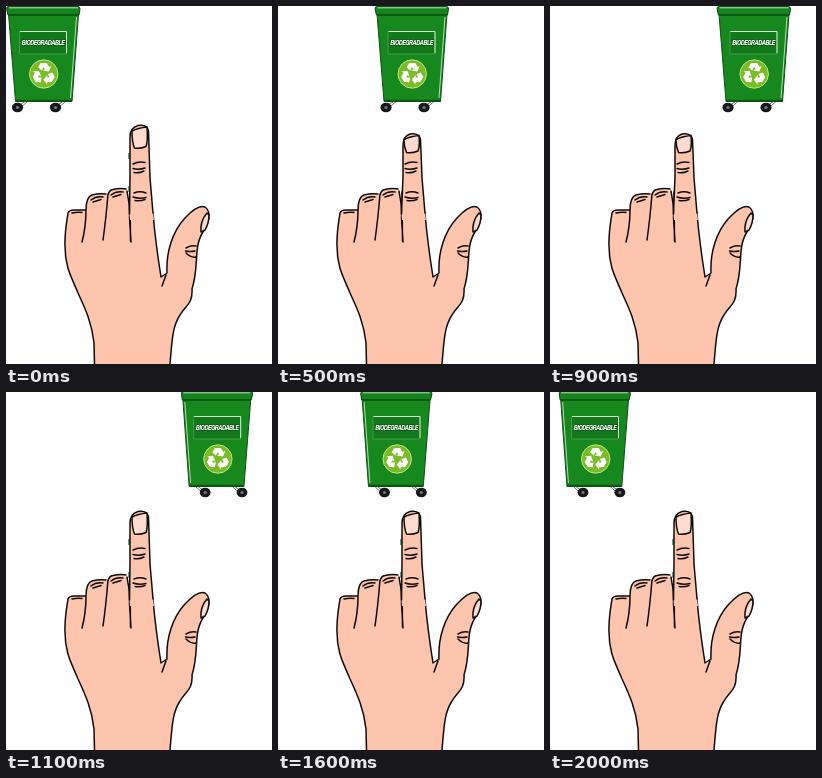
Animation of 266 by 358 pixels, one loop 2100 ms. Source, as an HTML page:

```html
<!DOCTYPE html>
<html lang="en">
<head>
<meta charset="utf-8">
<title>Finger and bin</title>
<style>
html, body { margin: 0; width: 100%; height: 100%; overflow: hidden; background: #fff; }
svg { display: block; width: 266px; height: 358px; }
.ink { fill: none; stroke: #100c0a; stroke-width: 1.5; stroke-linecap: round; stroke-linejoin: round; }
.skin { fill: #fdc4ae; }
.ink.nail { fill: #fddbcd; }
.label { font: italic 700 6.6px Roboto, "Liberation Sans", sans-serif; letter-spacing: -.6px; text-anchor: middle;
  fill: #fff; stroke: #0a4a10; stroke-width: 1px; paint-order: stroke; }
</style>
</head>
<body>
<svg viewBox="0 0 266 358">
  <defs>
    <g id="wheel">
      <path d="M0-1L9-7M2 1L10-6" stroke="#777e80"/>
      <ellipse rx="5.6" ry="4.8" fill="#161819"/>
      <circle r="1.6" fill="#777b7d"/>
    </g>
    <path id="arrow" d="M-5.6-6.7L-3-11H2.9L5.4-7 7.5-8.2 5.200-2.500-1-3.500 1.200-4.700 0-7-2.100-3.600Z" fill="#fff"/>
  </defs>

  <g id="bin">
    <g id="shell">
      <use href="#wheel" x="11.5" y="101.500"/>
      <use href="#wheel" x="49.500" y="101.500"/>
      <path d="M2.500 8H72.500L66 95.500H9.500Z" fill="#16881e" stroke="#0a5212"/>
      <path d="M70.500 11L64.500 92" stroke="#b4dcb6"/>
      <path d="M10 94.500H66" stroke="#0a5712" stroke-width="1.500"/>
      <path d="M2 .6H72Q74 .6 74 3L73 9H2L.6 3Q.6.6 2 .6Z" fill="#16841e" stroke="#07470f"/>
      <path d="M3 1.800H72" stroke="#b9dfbb"/>
      <path d="M3 8.900H72" stroke="#094f11" stroke-width="1.400"/>
    </g>
    <path d="M13.500 48V25.500H60.500V48Z" fill="#12781a" stroke="#4fa555" stroke-width=".8"/>
    <path d="M14 25.500H60.500V47" fill="none" stroke="#d2ead3"/>
    <text class="label" x="37" y="38.700">BIODEGRADABLE</text>
    <circle cx="37.700" cy="68" r="14.200" fill="#79bd24" stroke="#c4e392"/>
    <g transform="translate(37.700 68)">
      <use href="#arrow"/>
      <use href="#arrow" transform="rotate(120)"/>
      <use href="#arrow" transform="rotate(240)"/>
    </g>
  </g>

  <path class="skin" d="M88.500 358L88 337C86 318 80 304 72 287C66 272 59 262 59 240C58.500 226 61 214 62 207Q63 204 68 204L80 204Q80 191 86 189Q93 186 101 189Q103 184 107 183Q117 181 121 186L123 207H147C149 232 152 252 155 271L161 267C160 247 166 226 179 212Q192 198 199 201Q207 207 199 223C186 240 194 258 186 283C187 298 179 300 174 309C166 321 166 336 164 358Z"/>
  <path class="ink" d="M88.500 358L88 337C86 318 80 304 72 287C66 272 59 262 59 240C58.500 226 61 214 62 207Q63 204 68 204L79 204M80 204Q80 221 76 236M80 204Q80 191 86 189Q93 187 100 188M102 188Q100 213 97 234M102 189Q103 184 107 183.500Q114 182 120 183M121 185Q124 199 123.500 212L125 236M124 186L124.500 235M147 207C149 232 152 252 155 271L161 267C160 247 166 226 179 212Q192 198 199 201Q207 207 199 223C186 240 194 258 186 283C187 298 179 300 174 309C166 321 166 336 164 358M160 269L156 280"/>
  <path class="ink" d="M66 207Q71 206 76 206.500M85 194Q90 190 97 191M87 196L95 193.500M105 189Q110 185 117 186M107 191L115 188.500M180 242Q185 239 190 240M179.500 245Q184 246 189 245M180 247Q185 252 190 251"/>
  <path class="ink nail" d="M201 207Q194 215 195 226L199 224Q203 217 203 209Z"/>

  <path id="remnant" d="M123 147V153M123 180V186" stroke="#148447" stroke-width="1.400"/>
  <path id="fingerSkin" class="skin"/>
  <path id="fingerLine" class="ink"/>
  <path id="nail" class="ink nail"/>
  <path class="ink" d="M127 158Q133 155 139 156.500M127 162.500Q133 164 139 162M128 166.500Q133 167.500 138 165M128 187Q134 184.500 140 187M127 191Q133 193 140 191.500M129 194.500Q134 195.500 139 193.500"/>
</svg>
<script>
const STEP = 100, STEPS = 21, TURN = 11;
// Pairs of step and horizontal position; steps between are linear.
const track = [[0, 0], [2, 42], [5, 96.5], [6, 115.5], [9, 166.5], [10, 191.5], [13, 139.5], [16, 81.5], [18, 43], [20, 8]];
const get = id => document.getElementById(id);
const set = (id, name, value) => get(id).setAttribute(name, value);

function binX(step) {
  const i = Math.max(1, track.findIndex(([s]) => s >= step));
  const [s0, x0] = track[i - 1], [s1, x1] = track[i];
  return x0 + (x1 - x0) * (step - s0) / (s1 - s0);
}

function poseFinger(raised) {
  const top = raised ? 119 : 127.5, left = raised ? 124 : 125;
  const base = raised ? 141.5 : 146;
  const edge = `M123.500 208L${left} 170V${top + 12}Q${left} ${top + 3} 132 ${top + 0.5}Q141 ${top - 1} 142.500 ${top + 6}L144 172L147 207`;
  set("fingerSkin", "d", edge + "L148 214H124Z");
  set("fingerLine", "d", edge);
  set("nail", "d", `M126 ${top + 6}Q132 ${top + 3} 141 ${top + 2}Q142 ${base - 6} 140 ${base - 1}Q134 ${base + 1.5} 128.500 ${base + 0.5}Q126 ${base - 5} 126 ${top + 6}Z`);
  get("remnant").style.display = raised ? "" : "none";
}

function draw(time) {
  const step = Math.floor(time / STEP) % STEPS;
  const back = step >= TURN;
  set("bin", "transform", `translate(${binX(step)} ${back ? -1 : 0})`);
  set("shell", "transform", back ? "translate(73 0) scale(-.97 1)" : "");
  poseFinger(back || step === 0);
}

const start = performance.now();
function tick() {
  draw(performance.now() - start);
  requestAnimationFrame(tick);
}
tick();
</script>
</body>
</html>
```
